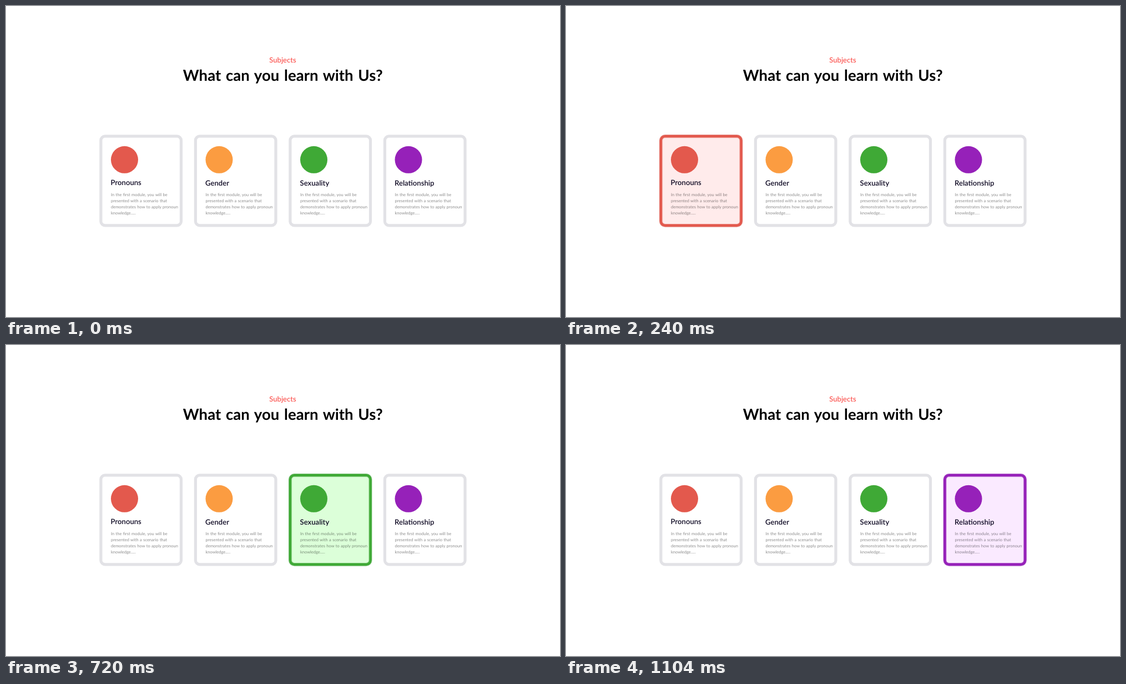
Write an HTML page that moves like this. It is 998 px wide and 561 px high and loops after 1.2 s.

```html
<!DOCTYPE html>
<html lang="en">
<head>
<meta charset="utf-8">
<title>Subjects</title>
<style>
  html, body { margin: 0; width: 100%; height: 100%; overflow: hidden; background: #fff; }
  svg { display: block; width: 100%; height: 100%; }
  text { font-family: Lato, "Open Sans", sans-serif; text-rendering: geometricPrecision; }

  .kicker { font-size: 13px; font-weight: 600; fill: #fb5b57; text-anchor: middle; }
  .title { font-size: 27.6px; font-weight: 700; word-spacing: 2px; text-anchor: middle; }
  .name { font-size: 13.1px; font-weight: 600; fill: #0e0923; }
  .copy { font-size: 7.5px; word-spacing: .45px; fill: #000; fill-opacity: .45; }

  .card { --step: 240ms; }
  .frame { fill: #fff; stroke: #e2e2e6; stroke-width: 5.2; }
  .dot { fill: var(--ink); }
  .lit {
    fill: var(--tint); stroke: var(--ink); stroke-width: 5.2;
    animation: light 1200ms step-end infinite;
    animation-delay: calc(var(--step) * (var(--n) - 5));
  }
  @keyframes light {
    0% { opacity: 1; }
    20%, 100% { opacity: 0; }
  }
</style>
</head>
<body>
<svg viewBox="0 0 998 561">
  <defs>
    <rect id="box" x="2.6" y="2.6" width="144.6" height="161" rx="7.5"/>
    <g id="copy" class="copy">
      <text x="20.7" y="110.7">In the first module, you will be</text>
      <text x="20.7" y="121.7">presented with a scenario that</text>
      <text x="20.7" y="132.7">demonstrates how to apply pronoun</text>
      <text x="20.7" y="143.7">knowledge.....</text>
    </g>
  </defs>

  <text class="kicker" x="498.5" y="101.5">Subjects</text>
  <text class="title" x="498.7" y="135.3">What can you learn with Us?</text>

  <g class="card" transform="translate(168.3 232.3)" style="--n:1; --ink:#e3594d; --tint:#ffebeb">
    <use href="#box" class="frame"/>
    <use href="#box" class="lit"/>
    <circle class="dot" cx="45.2" cy="45" r="24.5"/>
    <text class="name" x="20.3" y="90.4">Pronouns</text>
    <use href="#copy"/>
  </g>
  <g class="card" transform="translate(338.8 232.3)" style="--n:2; --ink:#fb9c41; --tint:#ffead8">
    <use href="#box" class="frame"/>
    <use href="#box" class="lit"/>
    <circle class="dot" cx="45.2" cy="45" r="24.5"/>
    <text class="name" x="20.3" y="92.2">Gender</text>
    <use href="#copy"/>
  </g>
  <g class="card" transform="translate(509.3 232.3)" style="--n:3; --ink:#3fa936; --tint:#dcffd9">
    <use href="#box" class="frame"/>
    <use href="#box" class="lit"/>
    <circle class="dot" cx="45.2" cy="45" r="24.5"/>
    <text class="name" x="20.3" y="92.2">Sexuality</text>
    <use href="#copy"/>
  </g>
  <g class="card" transform="translate(679.8 232.3)" style="--n:4; --ink:#9621b9; --tint:#faeaff">
    <use href="#box" class="frame"/>
    <use href="#box" class="lit"/>
    <circle class="dot" cx="45.2" cy="45" r="24.5"/>
    <text class="name" x="20.3" y="92.2">Relationship</text>
    <use href="#copy"/>
  </g>
</svg>
</body>
</html>
```
